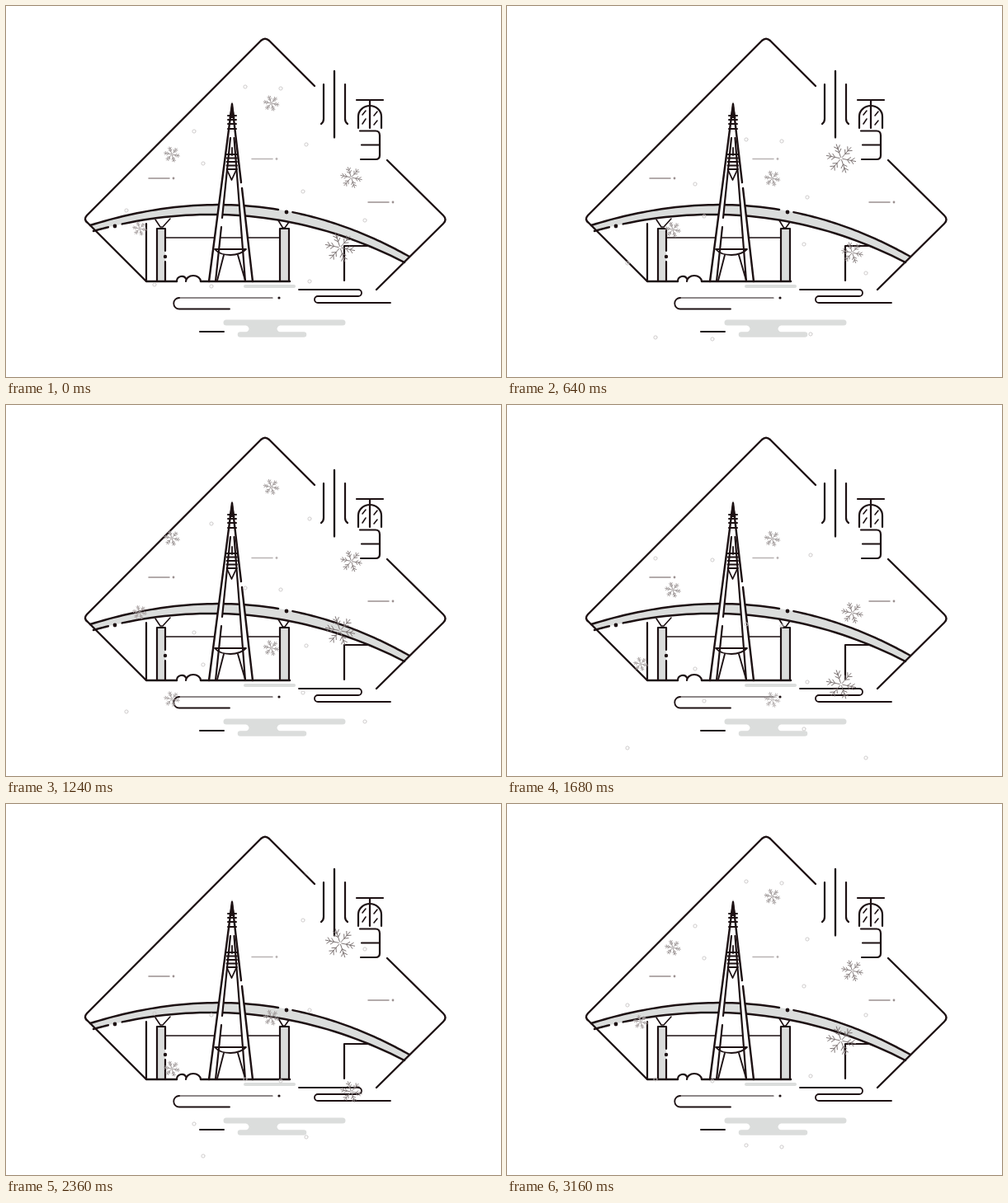
Write an HTML page with a canvas that moves like this. It is 600 px wide and 450 px high and loops after 3.2 s.

```html
<!DOCTYPE html>
<html lang="zh">
<head>
<meta charset="utf-8">
<title>Light snow</title>
<style>
html, body { margin: 0; width: 100%; height: 100%; overflow: hidden; background: #fff; }
canvas { display: block; }
</style>
</head>
<body>
<canvas id="stage" width="600" height="450"></canvas>
<script>
const ctx = document.getElementById('stage').getContext('2d');
const LOOP = 3200, STEP = 40, SECOND = 1370;
const INK = '#1d1113', FILL = '#dbdddc';

// x, y at time zero, radius, speed in px/ms, colour
const flakes = [
  [321.5, 118, 9.5, 0.1425, '#a19a9a'],
  [201, 180, 9.5, 0.1425, '#a19a9a'],
  [418.5, 208, 13, 0.1425, '#8c8484'],
  [405, 293, 18, 0.148, '#7a7171'],
  [162, 270, 8.5, 0.1425, '#ada6a6']
];
const dots = [
  [290, 98], [333, 100], [228, 152], [239, 191], [364, 168], [146, 248],
  [360, 225], [435, 260], [249, 340], [180, 338], [368, 334]
];

const upper = [[102, 266], [230, 226], [360, 231], [489, 304]];
const lower = [[106, 273], [230, 238], [360, 247.5], [483, 311]];

const clamp = v => Math.max(0, Math.min(1, v));

function stroke(path, width = 2.2, color = INK) {
  ctx.lineWidth = width;
  ctx.strokeStyle = color;
  ctx.stroke(new Path2D(path));
}

function fill(path, color = FILL) {
  ctx.fillStyle = color;
  ctx.fill(new Path2D(path));
}

function dot(x, y, r, color = INK) {
  ctx.fillStyle = color;
  ctx.beginPath();
  ctx.arc(x, y, r, 0, Math.PI * 2);
  ctx.fill();
}

function bez(p, t) {
  const u = 1 - t;
  return [0, 1].map(i => u * u * u * p[0][i] + 3 * u * u * t * p[1][i] +
    3 * u * t * t * p[2][i] + t * t * t * p[3][i]);
}

function curve(p, from, to) {
  const pts = [];
  for (let i = 0; i <= 40; i++) pts.push(bez(p, from + (to - from) * i / 40).join(' '));
  return 'M' + pts.join('L');
}

function frame() {
  stroke('M374 97L319 42Q314 37.5 309 42L98 254Q93.5 259 99 263L170 334H207M236 334H344', 2.4);
  stroke('M462 187L530 254Q535 259 530 264L449 344', 2.4);
}

function water() {
  stroke('M290 340H349', 4, FILL);
  stroke('M267 384H408', 7, FILL);
  stroke('M284 398.5H361', 6.5, FILL);
  fill('M289 386Q300 391.5 289 397H334Q323 391.5 334 386Z');
  stroke('M355 344H427a4 4 0 0 1 0 8H378a4 4 0 0 0 0 8H466', 1.8);
  stroke('M323 354H209', 1.2);
  stroke('M210 354a6.5 6.5 0 0 0 0 13.5H271', 1.8);
  dot(331, 354, 1.6);
  stroke('M235 395H264', 2);
}

function pillars() {
  fill('M183 270h10v64h-10z');
  fill('M332 270h11v64h-11z');
  stroke('M170 264V334');
  stroke('M183 334V270H193V297M193 310V334');
  stroke('M332 334V270H343V334');
  stroke('M181 259L187 268H190L199 258M330 260L335.5 269H338L343 262', 1.6);
  dot(193, 304, 2.2);
  stroke('M193 281H332', 1.3);
}

function bridge() {
  fill(curve(upper, 0, 1) + curve(lower, 1, 0).replace('M', 'L') + 'Z');
  stroke(curve(upper, 0, 0.59), 2.5);
  stroke(curve(upper, 0.635, 1), 2.5);
  stroke(curve(lower, 0, 0.048), 2.5);
  stroke(curve(lower, 0.093, 1), 2.5);
  dot(340, 250, 2.4);
  dot(132, 267, 2.4);
}

function tower() {
  fill('M270 150L246 334H254L272 165V150Z', '#fff');
  fill('M277.5 150L299 334H290L276.5 165V150Z', '#fff');
  fill('M253 295H291Q284 302 272 302Q259 302 253 295Z', '#fff');
  stroke('M274 119L270 150L246 334M274 119L277.5 150L285 214M286 221L299 334', 2.4);
  stroke('M272 160L262 257M261 268L254 334M276.5 160L290 334');
  fill('M274 116L270.5 136H277.5Z', INK);
  for (const y of [133, 138, 143, 149]) stroke(`M269 ${y}H279`, 2);
  for (const y of [180, 184.5, 189, 193.5, 198]) stroke(`M267.5 ${y}H280`, 1.8);
  stroke('M274 172V181M268 199L273.5 211L279 199', 1.8);
  stroke('M253 295H291Q284 302 272 302Q259 302 253 295', 1.8);
  stroke('M264 302L256 333M281 302L290 333', 1.9);
}

function bushes() {
  stroke('M207 334A6 6 0 0 1 218.5 331.5M218 334A9 7 0 0 1 236 334');
}

function title() {
  stroke('M398 79V159.5', 2.3);
  stroke('M385 95V137Q385 141 382 143M411 95V137Q411 141 414 143');
  stroke('M425 114H457M441 114V148');
  stroke('M427 148V134A14 13 0 0 1 455 134V148');
  stroke('M436 127L432 132M436 137L432 143M450 128L446 133M450 139L446 144', 1.6);
  stroke('M429 151.5H448Q453 151.5 453 157V181Q453 186 448 186H430M431 168.5H453');
}

function breeze() {
  for (const [x, y, color] of [[173, 209, '#9b9090'], [298, 185.5, '#b9b3b3'], [439, 238, '#9b9090']]) {
    stroke(`M${x} ${y}h25`, 1.5, color);
    dot(x + 30, y, 1.4, color);
  }
}

function flake(x, y, r, color) {
  ctx.save();
  ctx.translate(x, y);
  ctx.rotate(0.2);
  ctx.scale(r, r);
  for (let i = 0; i < 6; i++) {
    stroke('M.1 0H1M.42 0L.62 -.2M.42 0L.62 .2M.68 0L.88 -.2M.68 0L.88 .2', 0.9 / r, color);
    ctx.rotate(Math.PI / 3);
  }
  ctx.restore();
}

// Snow shows only once it has passed the roof of the diamond.
const appear = (x, y) => clamp((y - (40 + Math.abs(x - 314)) + 9) / 12);

function snow(t) {
  for (const [x, y0] of dots) {
    for (const y of [y0 + t * 0.1, y0 + (t - LOOP) * 0.1]) {
      ctx.globalAlpha = appear(x, y);
      ctx.lineWidth = 0.9;
      ctx.strokeStyle = '#cbc8c8';
      ctx.beginPath();
      ctx.arc(x, y, 2.1, 0, Math.PI * 2);
      ctx.stroke();
    }
  }
  for (const [x, y0, r, v, color] of flakes) {
    for (const start of [0, SECOND, LOOP]) {
      const y = y0 + (t - start) * v;
      ctx.globalAlpha = appear(x, y) * clamp((361 - y) / 5);
      if (ctx.globalAlpha > 0) flake(x, y, r, color);
    }
  }
  ctx.globalAlpha = 1;
}

function draw(t) {
  ctx.fillStyle = '#fff';
  ctx.fillRect(0, 0, 600, 450);
  ctx.lineCap = 'round';
  ctx.lineJoin = 'round';
  water();
  pillars();
  bridge();
  tower();
  frame();
  bushes();
  stroke('M410 333V291H438');
  breeze();
  title();
  snow(t);
}

const begin = performance.now();
function tick() {
  const t = (performance.now() - begin) % LOOP;
  draw(Math.floor(t / STEP) * STEP);
  requestAnimationFrame(tick);
}
tick();
</script>
</body>
</html>
```
